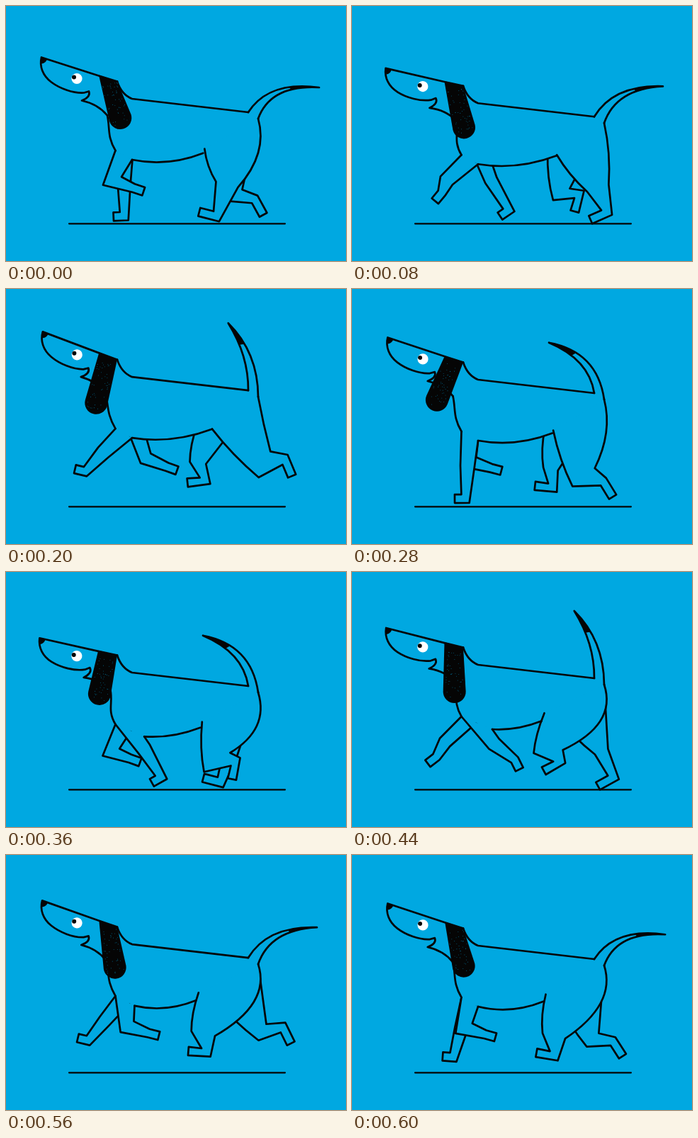
An HTML page with a canvas that plays this animation: 480 by 360 pixels, repeating every 0.64 s.

```html
<!DOCTYPE html>
<html lang="en">
<head>
<meta charset="utf-8">
<title>Walking dog</title>
<style>
  html, body { margin: 0; height: 100%; overflow: hidden; background: #00a8e1; }
  canvas { display: block; width: 480px; height: 360px; }
</style>
</head>
<body>
<canvas id="stage" width="480" height="360"></canvas>
<script>
const ctx = document.getElementById('stage').getContext('2d');
const BLUE = '#00a8e1', BLACK = '#050505';
const STEP = 40, STEPS = 16;
const FAR_LAG = 7.3; // the far legs run the same gait about half a cycle away
const { PI, sin, cos, atan2, min, max } = Math;

// time, body height, head tilt: one bounce per footfall
const bounce = [
  [0, 0, 0],
  [1, 11, -.09],
  [3, 0, -.06],
  [4.5, -7, .05],
  [7, -3, .01]
];

// time, knee x y, ankle x y, turn of the paw
const frontGait = [
  [0, 150, 247, 180, 257, 0],
  [3, 128, 239, 107, 262, .5],
  [5, 137, 237, 112, 261, 1.05],
  [7, 163, 252, 160, 296, 1.5],
  [9, 195, 241, 219, 290, 1.6],
  [12, 199, 244, 229, 256, 0],
  [15, 158, 247, 188, 255, 0]
];
const hindGait = [
  [0, 312, 252, 297, 297, 1.5],
  [3, 360, 254, 384, 286, 1.5],
  [5, 365, 252, 394, 246, 1.4],
  [7, 327, 267, 355, 273, .8],
  [9, 298, 264, 324, 263, 1.8],
  [12, 271, 250, 282, 272, 1.85],
  [15, 285, 257, 285, 284, 1.75]
];

// Looping Hermite interpolation with softened tangents
function sample(track, period, at) {
  const n = track.length, t = at % period;
  let i = n - 1;
  while (track[i][0] > t) i--;
  const row = k => track[(k + n) % n];
  const time = k => row(k)[0] + Math.floor(k / n) * period;
  const span = time(i + 1) - time(i), u = (t - time(i)) / span, v = 1 - u;
  const slope = (k, j) => .6 * span * (row(k + 1)[j] - row(k - 1)[j]) / (time(k + 1) - time(k - 1));
  return row(i).slice(1).map((a, m) => {
    const j = m + 1;
    return a + (row(i + 1)[j] - a) * u * u * (3 - 2 * u) + u * v * v * slope(i, j) - u * u * v * slope(i + 1, j);
  });
}

const mix = (a, b, t) => [a[0] + (b[0] - a[0]) * t, a[1] + (b[1] - a[1]) * t];
const polar = (p, angle, r) => [p[0] + cos(angle) * r, p[1] + sin(angle) * r];
const heading = (a, b) => atan2(b[1] - a[1], b[0] - a[0]);
const clamp = x => min(1, max(0, x));

function trace(draw, fill, stroke) {
  ctx.beginPath();
  draw();
  if (fill) { ctx.fillStyle = fill; ctx.fill(); }
  if (stroke) ctx.stroke();
}
const move = p => ctx.moveTo(...p);
const line = (...ps) => ps.forEach(p => ctx.lineTo(...p));
const quad = (c, p) => ctx.quadraticCurveTo(...c, ...p);
const disc = (x, y, r, color) => trace(() => ctx.arc(x, y, r, 0, 7), color);

// Leg joints for a moment of the gait; planted feet ignore the body's bounce
function pose(gait, step, bob) {
  const [kx, ky, ax, ay, turn] = sample(gait, STEPS, step);
  const settle = y => y + bob * clamp((290 - y) / 60);
  return { knee: [kx, settle(ky)], ankle: [ax, settle(ay)], turn };
}

// Front and back corner of a joint where two bones meet
function mitre(p, into, out, half) {
  const normal = (into + out + PI) / 2, r = half / max(cos((out - into) / 2), .7);
  return [polar(p, normal, r), polar(p, normal, -r)];
}

// Outline from the front of the knee round the paw to the back of the knee
function outline({ knee, ankle, turn }, hip, half, paw) {
  const shin = heading(knee, ankle), foot = shin + turn;
  const [kneeFront, kneeBack] = mitre(knee, heading(hip, knee), shin, half);
  const [instep, heel] = mitre(ankle, shin, foot, 6);
  const [toeTop, toeEnd] = mitre(polar(ankle, foot, paw), foot, foot, 6);
  return [kneeFront, instep, toeTop, toeEnd, heel, kneeBack];
}

// How far a front leg reaches back, 0 to 1
const reach = leg => clamp((leg.knee[0] - 165) / 35);

function frontLeg(leg, chest, belly, half) {
  const shape = outline(leg, mix(chest, belly, .5), half, 15);
  trace(() => { move(chest); line(...shape, belly); }, BLUE, true);
}

function groinOf(leg, bob) {
  const x = min(291, 266 + (leg.knee[0] - 271) * .3);
  return [x, 206 + bob + (285 - x) * .25];
}

function hindLeg(leg, bob, rump, half, round) {
  const shape = outline(leg, [325, 180 + bob], half, 25), hock = shape[5];
  const groin = groinOf(leg, bob), lift = (291 - groin[0]) / 25;
  const top = [groin[0] + 4 * lift, groin[1] - 12 * lift];
  const thigh = mix(top, shape[0], .5);
  const lean = 327 - leg.knee[0];
  const bend = round ? [368 + lean * .13, 205 + bob + lean * .2] : mix(hock, rump, .5);
  trace(() => {
    move(top);
    quad([thigh[0] - 5, thigh[1] + 2], shape[0]);
    line(...shape.slice(1));
    quad(bend, rump);
  }, BLUE, true);
  return { groin, hock, bend };
}

function drawTail(swing, baseA, baseB) {
  const base = mix(baseA, baseB, .5), up = -PI / 2;
  const angle = (12 + 63 * cos(swing) - 8 * cos(3 * swing)) * PI / 180;
  const tip = polar(base, up + angle, 98 + 8 * cos(angle));
  const bendA = polar(base, up + angle * .36, 54);
  const bendB = polar(bendA, angle, 12 - 6 * sin(angle));
  trace(() => { move(baseA); quad(bendA, tip); quad(bendB, baseB); }, null, true);

  const t = .67;
  const along = (from, bend) => mix(mix(from, bend, t), mix(bend, tip, t), t);
  trace(() => {
    move(along(baseA, bendA));
    quad(mix(bendA, tip, t), tip);
    quad(mix(bendB, tip, t), along(baseB, bendB));
  }, BLACK);
}

function drawEar(left, right, swing, step) {
  const mid = mix(left, right, .5);
  const end = [mid[0] + 19 * cos(swing + .27) + 6 * sin(2 * swing) - 1, mid[1] + 62 - 6 * cos(2 * swing)];
  const angle = heading(mid, end);
  trace(() => {
    move(left);
    line(right);
    ctx.arc(...end, 16, angle - PI / 2, angle + PI / 2);
    ctx.closePath();
  }, BLACK);

  // Dry-brush grain
  let seed = step * 97 + 11;
  const random = () => (seed = (seed * 16807 + 7) % 2147483647) / 2147483647;
  ctx.globalAlpha = .5;
  for (let i = 0; i < 45; i++) {
    const p = polar(mix(mid, end, .15 + random()), angle + PI / 2, (random() - .5) * 24);
    disc(...p, .55, BLUE);
  }
  ctx.globalAlpha = 1;
}

// The face hangs from the nape, with the nose at its own zero point
function drawFace(nape, tilt) {
  ctx.save();
  ctx.translate(...nape);
  ctx.rotate(tilt);
  ctx.translate(-107, -34);
  trace(() => {
    ctx.moveTo(107, 34);
    ctx.lineTo(81, 26);
    ctx.lineTo(0, 0);
    ctx.bezierCurveTo(-3, 13, 2, 26, 14, 35);
    ctx.bezierCurveTo(26, 44, 45, 51, 60, 50);
    ctx.lineTo(67, 48);
    ctx.quadraticCurveTo(70, 56, 57, 61);
    ctx.quadraticCurveTo(80, 66, 93, 82);
  }, null, true);
  trace(() => {
    ctx.moveTo(0, 0);
    ctx.lineTo(8, 2);
    ctx.quadraticCurveTo(7, 8, 0, 9);
  }, BLACK);
  disc(50, 30, 7.6, '#fff');
  disc(46, 28, 3, BLACK);
  ctx.restore();
}

function draw(step) {
  const swing = step / STEPS * 2 * PI;
  const [bob, tilt] = sample(bounce, STEPS / 2, step);
  const at = (x, y) => [x, y + bob];

  const nape = at(157, 106.5), withers = at(178, 131);
  const tailFront = at(342, 150), rump = at(356, 159), chest = at(154.5, 204);
  const onHead = (x, y) => polar(polar(nape, tilt, x - 107), tilt + PI / 2, y - 34);
  const jaw = onHead(93, 82);

  const near = pose(frontGait, step, bob), far = pose(frontGait, step + FAR_LAG, bob);
  const bellyAt = leg => at(178 + 20 * reach(leg), 217 + 5 * reach(leg));
  const belly = bellyAt(near);

  ctx.fillStyle = BLUE;
  ctx.fillRect(0, 0, 480, 360);
  ctx.strokeStyle = BLACK;
  ctx.lineJoin = ctx.lineCap = 'round';

  ctx.lineWidth = 2.2;
  trace(() => { move([89, 307.3]); line([394, 307.3]); }, null, true);

  ctx.lineWidth = 2.7;
  frontLeg(far, [chest[0] + 18 * reach(far), chest[1]], at(bellyAt(far)[0], 211), 9);
  hindLeg(pose(hindGait, step + FAR_LAG, bob), bob, rump, 10, false);

  const back = () => {
    move(nape);
    quad([nape[0] + 6, withers[1] - 6], withers);
    line(tailFront);
  };
  const haunch = pose(hindGait, step, bob);
  const groin = groinOf(haunch, bob);
  const sag = mix(belly, groin, .5);
  sag[1] += 15 - 7 * reach(near);
  trace(() => {
    back();
    line(rump, haunch.knee, groin);
    quad(sag, belly);
    line(chest, jaw);
  }, BLUE);

  hindLeg(haunch, bob, rump, 16, true);
  frontLeg(near, chest, belly, 10);
  trace(back, null, true);
  trace(() => { move(belly); quad(sag, groin); }, null, true);
  trace(() => {
    move(jaw);
    ctx.bezierCurveTo(jaw[0] + 4, jaw[1] + 18, chest[0] - 12, chest[1] - 20, ...chest);
  }, null, true);
  drawTail(swing, tailFront, rump);
  drawFace(nape, tilt);
  drawEar(onHead(81, 25), nape, swing, step);
}

const start = performance.now();
function tick() {
  draw(Math.floor((performance.now() - start) / STEP) % STEPS);
  requestAnimationFrame(tick);
}
tick();
</script>
</body>
</html>
```
